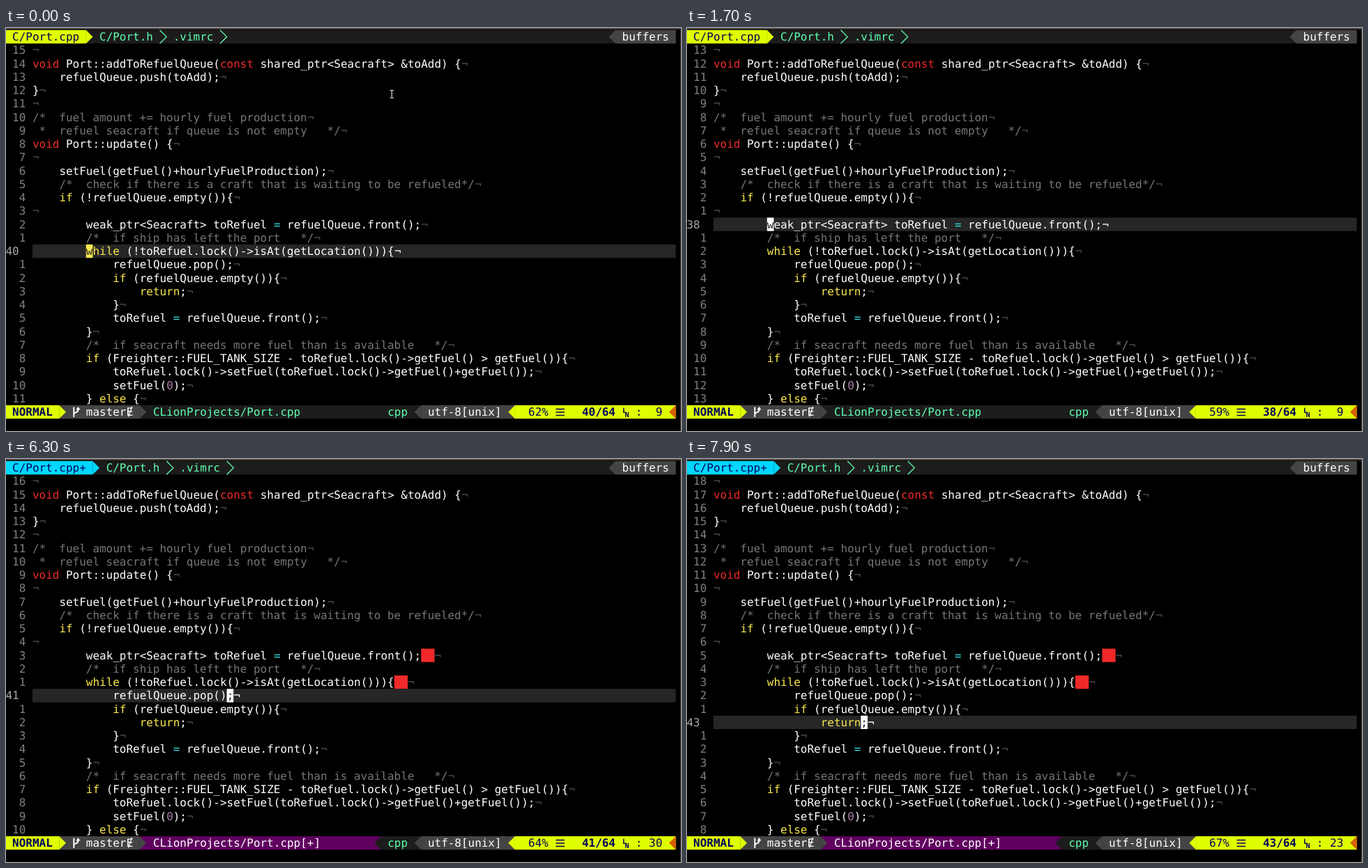
Recreate the animation shown at these times as an HTML page. Size 968 by 579 pixels, loop 8 s.

```html
<!DOCTYPE html>
<html lang="en">
<head>
<meta charset="utf-8">
<title>Editor session</title>
<style>
  html, body { margin: 0; width: 100%; height: 100%; overflow: hidden; background: #000; }
  svg { display: block; width: 968px; height: 579px; }
  text {
    font: 15.96px "DejaVu Sans Mono", "DejaVu Sans", monospace;
    white-space: pre;
    text-rendering: geometricPrecision;
  }
  .bold { font-weight: bold; }
</style>
</head>
<body>
<svg id="screen" viewBox="0 0 968 579" xml:space="preserve"></svg>
<script>
const W = 9.61, H = 19.25, LEFT = -0.5, TOP = 3, BASELINE = 15.2;
const GUTTER = 4, COLUMNS = 100, FIRST_LINE = 25, LAST_LINE = 64;
const STATUS_ROW = 28, LOOP = 8000;

const C = {
  back: '#000', text: '#fff', comment: '#767676', eol: '#4e4e4e', number: '#808080',
  currentNumber: '#a8a8a8', cursorLine: '#262626', red: '#ef2929', yellow: '#fce94f',
  cyan: '#34e2e2', purple: '#ad7fa8', match: '#06989a',
  bar: '#1c1c1c', grey: '#444', mint: '#5fffaf', lime: '#dfff00', sky: '#00d7ff',
  navy: '#00005f', blue: '#005fff', plum: '#5f005f', orange: '#d75f00', edge: '#4a423e'
};

const code = `
void Port::addToRefuelQueue(const shared_ptr<Seacraft> &toAdd) {
    refuelQueue.push(toAdd);
}

/*  fuel amount += hourly fuel production
 *  refuel seacraft if queue is not empty   */
void Port::update() {

    setFuel(getFuel()+hourlyFuelProduction);
    /*  check if there is a craft that is waiting to be refueled*/
    if (!refuelQueue.empty()){

        weak_ptr<Seacraft> toRefuel = refuelQueue.front();
        /*  if ship has left the port   */
        while (!toRefuel.lock()->isAt(getLocation())){
            refuelQueue.pop();
            if (refuelQueue.empty()){
                return;
            }
            toRefuel = refuelQueue.front();
        }
        /*  if seacraft needs more fuel than is available   */
        if (Freighter::FUEL_TANK_SIZE - toRefuel.lock()->getFuel() > getFuel()){
            toRefuel.lock()->setFuel(toRefuel.lock()->getFuel()+getFuel());
            setFuel(0);
        } else {`.split('\n');

// Each step overrides the fields of the one before it.
const steps = [
  [0, { line: 40, col: 9, cursor: true, pointer: true, spaces: {}, match: [] }],
  [700, { cursor: false }],
  [1100, { line: 41, cursor: true, pointer: false }],
  [1200, { line: 42 }],
  [1300, { line: 41 }],
  [1400, { line: 40 }],
  [1500, { line: 39 }],
  [1700, { line: 38 }],
  [5300, { line: 40, col: 54, cursor: false, edited: true, message: true,
           spaces: { 38: 2 }, match: [[40, 54], [46, 9]] }],
  [5500, { col: 56, cursor: true, insert: true, spaces: { 38: 2, 40: 1 }, match: [] }],
  [5700, { col: 57, spaces: { 38: 2, 40: 2 } }],
  [6000, { pending: 'j' }],
  [6300, { line: 41, col: 30, insert: false, message: false, pending: '' }],
  [6500, { line: 42, col: 37, match: [[42, 37], [44, 13]] }],
  [6900, { line: 43, col: 23, match: [] }],
  [7300, { cursor: false }],
  [7900, { cursor: true }]
];
let merged = {};
const timeline = steps.map(([time, change]) => [time, merged = { ...merged, ...change }]);

const escapeText = s => s.replace(/&/g, '&amp;').replace(/</g, '&lt;');
const colLeft = col => LEFT + col * W;
const rowTop = row => TOP + row * H;

function put(row, col, s, fill, bold) {
  return `<text x="${colLeft(col)}" y="${rowTop(row) + BASELINE}" fill="${fill}"` +
    `${bold ? ' class="bold"' : ''}>${escapeText(s)}</text>`;
}

function block(row, col, count, fill) {
  return `<rect x="${colLeft(col)}" y="${rowTop(row)}" width="${count * W}" height="${H}" fill="${fill}"/>`;
}

// dir 1 points right, -1 points left; thin draws only the outline.
function arrow(row, col, dir, fill, thin) {
  const y = rowTop(row), base = colLeft(dir > 0 ? col : col + 1);
  const style = thin ? `fill="none" stroke="${fill}" stroke-width="1.3"` : `fill="${fill}"`;
  return `<path d="M${base} ${y}l${dir * W} ${H / 2}l${-dir * W} ${H / 2}" ${style}/>`;
}

function tokens(s) {
  if (/^\s*(\/\*|\*)/.test(s)) return [[0, s, C.comment]];
  const found = [];
  const pattern = /\b(void|const)\b|\b(if|while|return|else)\b|( = )|\b(0)\b/g;
  let at = 0;
  for (const m of s.matchAll(pattern)) {
    if (m.index > at) found.push([at, s.slice(at, m.index), C.text]);
    found.push([m.index, m[0], m[1] ? C.red : m[2] ? C.yellow : m[3] ? C.cyan : C.purple]);
    at = m.index + m[0].length;
  }
  if (at < s.length) found.push([at, s.slice(at), C.text]);
  return found;
}

function codeLine(source, index, state) {
  const line = FIRST_LINE + index, row = index + 1, current = line === state.line;
  const spaces = state.spaces[line] || 0, end = source.length + spaces;
  const label = current ? String(line) : String(Math.abs(line - state.line)).padStart(3);
  const back = current ? C.cursorLine : C.back;
  const parts = [...tokens(source),
    [end, current && state.pending || '¬', current ? C.text : C.eol]];

  let out = current ? block(row, GUTTER, COLUMNS - GUTTER, back) : '';
  out += put(row, 0, label, current ? C.currentNumber : C.number);
  if (spaces) out += block(row, GUTTER + source.length, spaces, C.red);
  for (const [at, s, fill] of parts) {
    const lead = s.length - s.trimStart().length;
    out += put(row, GUTTER + at + lead, s.trim(), fill);
  }

  const partAt = col => parts.find(([at, s]) => col >= at && col < at + s.length) || [col, ' ', C.text];
  const cell = (col, ground, ink) => {
    const [at, s] = partAt(col);
    return block(row, GUTTER + col, 1, ground) + put(row, GUTTER + col, s[col - at], ink);
  };
  const matched = state.match.filter(m => m[0] === line);
  for (const [, col] of matched) out += cell(col - 1, C.match, C.text);
  if (current && state.cursor) {
    const col = state.col - 1, [at, s, fill] = partAt(col);
    out += cell(col, s[col - at] === ' ' ? C.text : fill, matched.length ? C.match : back);
  }
  return out;
}

function tabBar({ edited }) {
  const name = edited ? 'C/Port.cpp+' : 'C/Port.cpp';
  const end = name.length + 2, fill = edited ? C.sky : C.lime;
  return block(0, 0, COLUMNS, C.bar) +
    block(0, 0, end, fill) + arrow(0, end, 1, fill) + put(0, 1, name, C.navy) +
    put(0, end + 2, 'C/Port.h', C.mint) + arrow(0, end + 11, 1, C.mint, true) +
    put(0, end + 13, '.vimrc', C.mint) + arrow(0, end + 20, 1, C.mint, true) +
    arrow(0, 90, -1, C.grey) + block(0, 91, 9, C.grey) + put(0, 92, 'buffers', C.text);
}

function statusBar({ line, col, edited, insert }) {
  const r = STATUS_ROW, y = rowTop(r);
  const main = insert ? C.sky : C.lime, side = insert ? C.blue : C.grey;
  const inner = insert ? C.navy : C.bar, file = edited ? C.plum : inner;
  const percent = Math.floor(line / LAST_LINE * 100);
  const branch = `<path d="M97.3 ${y + 2.5}v14.5M97.3 ${y + 13.5}q0-2.5 3.2-3.3q3-.8 3-4.7"
    fill="none" stroke="#fff" stroke-width="1.9"/><path d="M100.4 ${y + 6.5}l3.1-4.5l3 4.5z" fill="#fff"/>`;
  const menu = `<path d="M788.5 ${y + 5.5}h12.5m-12.5 4.5h12.5m-12.5 4.5h12.5"
    stroke="${C.navy}" stroke-width="1.7"/>`;
  const small = (x, dy, s) => `<text x="${x}" y="${y + dy}" fill="${C.navy}" class="bold"
    style="font-size:10px">${s}</text>`;

  return block(r, 0, COLUMNS, inner) +
    block(r, 20, 36, file) + (edited ? arrow(r, 55, -1, inner) + block(r, 56, 5, inner) : '') +
    block(r, 8, 12, side) + arrow(r, 20, 1, side) +
    block(r, 0, 8, main) + arrow(r, 8, 1, main) +
    put(r, 1, insert ? 'INSERT' : 'NORMAL', C.navy, true) +
    branch + put(r, 12, 'masterɆ', C.text) +
    put(r, 22, 'CLionProjects/Port.cpp' + (edited ? '[+]' : ''), edited ? C.text : C.mint) +
    put(r, 57, 'cpp', insert ? C.text : C.mint) +
    arrow(r, 61, -1, side) + block(r, 62, 14, side) + put(r, 63, 'utf-8[unix]', C.text) +
    arrow(r, 75, -1, main) + block(r, 76, 24, main) +
    put(r, 78, percent + '%', C.navy) + menu +
    put(r, 86, `${line}/${LAST_LINE}`, C.navy, true) +
    small(884, 10.5, 'L') + small(887.5, 17, 'N') +
    put(r, 94, ':' + String(col).padStart(3), C.navy) +
    arrow(r, 99, -1, C.orange);
}

const frameEdge = `<path d="M0 0H968V579H967V2H0z" fill="${C.edge}"/>`;
const pointer = `<path d="M550.5 89.5h2l.8.8l.8-.8h2M553.3 90v10M550.5 100.5h2l.8-.8l.8.8h2"
  fill="none" stroke="#ddd" stroke-width="1.2"/>`;

const screenEl = document.getElementById('screen');
let shown;

function tick() {
  const time = performance.now() % LOOP;
  const state = timeline.findLast(([start]) => start <= time)[1];
  if (state !== shown) {
    shown = state;
    screenEl.innerHTML = frameEdge + tabBar(state) +
      code.map((source, i) => codeLine(source, i, state)).join('') + statusBar(state) +
      (state.message ? put(STATUS_ROW + 1, 0, '-- INSERT --', C.text, true) : '') +
      (state.pointer ? pointer : '');
  }
  requestAnimationFrame(tick);
}
tick();
</script>
</body>
</html>
```
